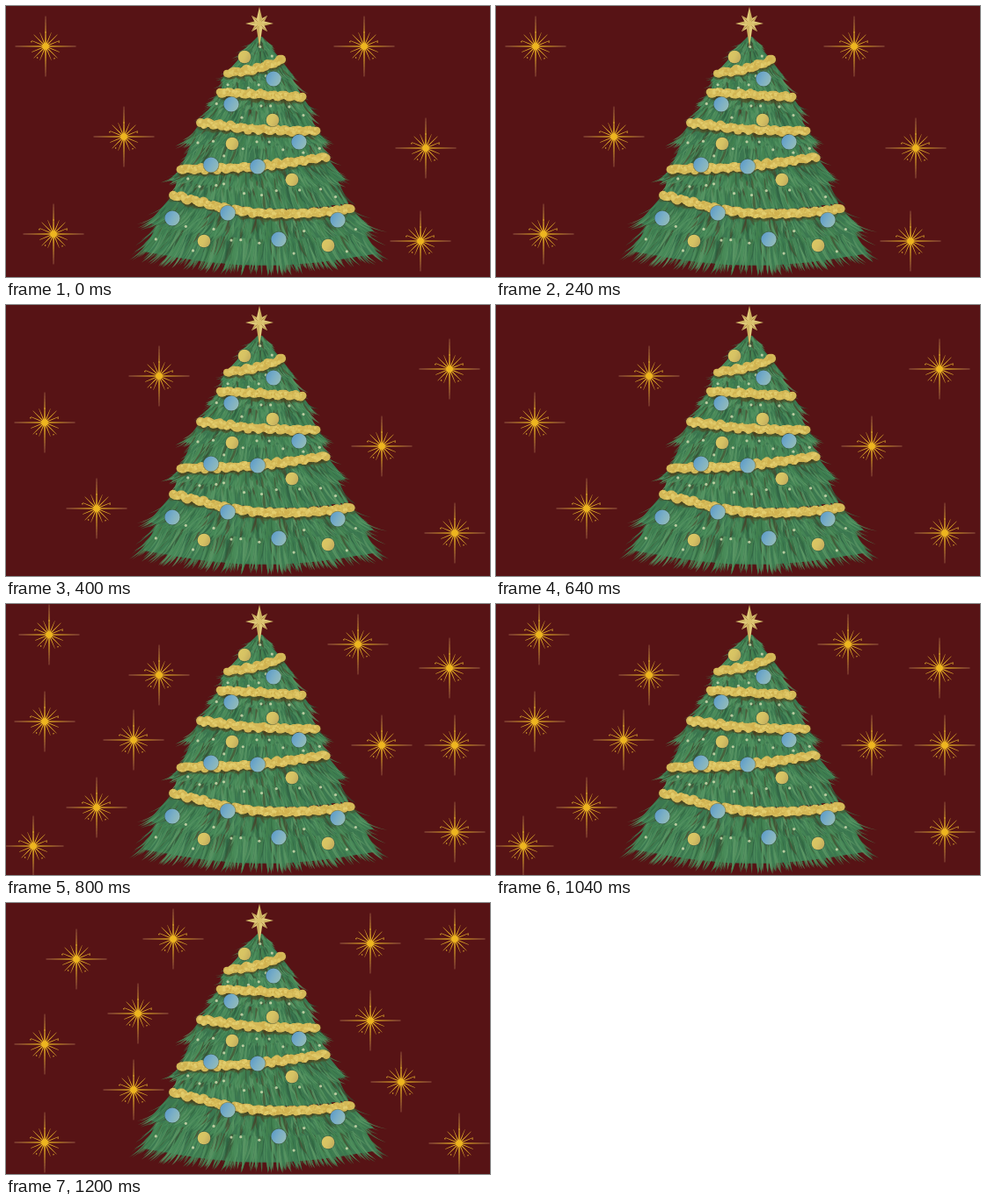
An HTML page with a canvas for the animation above (1600 ms loop, 550 px wide and 309 px high).

```html
<!DOCTYPE html>
<html lang="en">
<head>
<meta charset="utf-8">
<title>Christmas tree with twinkling stars</title>
<style>
  html, body { margin: 0; width: 100%; height: 100%; overflow: hidden; background: #571315; }
  canvas, svg { position: absolute; left: 0; top: 0; width: 100vw; height: 100vh; display: block; }
  .set { visibility: hidden; animation: twinkle 1600ms step-end infinite; }
  @keyframes twinkle {
    0% { visibility: visible; }
    25%, 100% { visibility: hidden; }
  }
</style>
</head>
<body>
<canvas id="tree"></canvas>
<svg id="sky" viewBox="0 0 550 309"></svg>
<script>
const W = 550, H = 309;

// ---------- twinkling stars ----------
const middleSet = [[174, 81], [44, 134], [103, 232], [504, 73], [427, 161], [510, 260]];
const starSets = [
  [[45, 46], [407, 46], [134, 149], [477, 162], [54, 260], [471, 268]],
  middleSet,
  [...middleSet, [49, 35], [145, 155], [31, 276], [400, 46], [510, 161]],
  [[190, 41], [80, 64], [150, 126], [44, 161], [145, 213], [44, 273],
   [414, 46], [510, 41], [414, 134], [449, 204], [515, 274]]
];

function sparkleShape() {
  let shape = '<circle r="3.8"/>';
  for (let i = 0; i < 16; i++) {
    const long = i % 4 === 0;
    const length = long ? 34.5 : i % 2 ? 17 : 19;
    const half = long ? 0.85 : 0.65;
    shape += `<path transform="rotate(${i * 22.5})" d="M0 ${-half}L${length} -.2V.2L0 ${half}z"/>`;
  }
  for (let i = 0; i < 5; i++)
    shape += `<circle transform="rotate(${i * 72 - 18})" cx="${16 + i % 2}" r=".75"/>`;
  return shape;
}

document.getElementById('sky').innerHTML =
  `<defs><radialGradient id="gold" gradientUnits="userSpaceOnUse" cx="0" cy="0" r="35">
     <stop offset="0" stop-color="#efb71e"/><stop offset=".5" stop-color="#dca62b"/>
     <stop offset="1" stop-color="#d39a70"/></radialGradient>
   <g id="sparkle" fill="url(#gold)">${sparkleShape()}</g></defs>` +
  starSets.map((set, i) =>
    `<g class="set" style="animation-delay:${i * 400 - 1600}ms">` +
    set.map(([x, y]) => `<use href="#sparkle" x="${x}" y="${y}"/>`).join('') + '</g>').join('');

// ---------- drawing helpers ----------
const canvas = document.getElementById('tree');
const scale = window.devicePixelRatio || 1;
canvas.width = W * scale;
canvas.height = H * scale;
const ctx = canvas.getContext('2d');
ctx.scale(scale, scale);

let seed = 2412;
const random = () => (seed = (seed * 16807) % 2147483647) / 2147483647;
const spread = (a) => (random() * 2 - 1) * a;
const pick = (list) => list[Math.floor(random() * list.length)];
const mix = (a, b, t) => a + (b - a) * t;

function disc(x, y, r, color) {
  ctx.fillStyle = color;
  ctx.beginPath();
  ctx.arc(x, y, r, 0, Math.PI * 2);
  ctx.fill();
}

function needle([x0, y0], [x1, y1], width, color) {
  const cx = mix(x0, x1, 0.3), cy = mix(y0, y1, 0.65);
  ctx.fillStyle = color;
  ctx.beginPath();
  ctx.moveTo(x0, y0);
  ctx.quadraticCurveTo(cx - width, cy, x1, y1);
  ctx.quadraticCurveTo(cx + width, cy, x0, y0);
  ctx.fill();
}

// ---------- tree ----------
// Hanging lines from apex through the garlands to the hem: [left x, left y, right x, right y, sag]
const lines = [
  [286, 35, 291, 35, 0],
  [251, 76, 313, 62, 3],
  [243, 98, 337, 104, 0],
  [221, 133, 353, 142, 3],
  [198, 186, 364, 172, 4],
  [190, 215, 392, 231, 13],
  [152, 287, 425, 288, 15]
];
const onLine = ([ax, ay, bx, by, sag], u) =>
  [mix(ax, bx, u), mix(ay, by, u) + sag * Math.sin(Math.PI * u)];

const greens = ['#42804f', '#4a8c5a', '#539462', '#458757', '#3b7850', '#5c9765'];
const shades = ['#2b5b3d', '#30643f', '#45482c', '#4c4029', '#385236'];

function paintLayer(upper, lower) {
  const at = (u, v) => {
    const [x0, y0] = onLine(upper, u), [x1, y1] = onLine(lower, u);
    return [mix(x0, x1, v), mix(y0, y1, v)];
  };
  ctx.fillStyle = '#3c7750';
  ctx.beginPath();
  for (let u = 0; u <= 1.001; u += 0.05) ctx.lineTo(...at(u, 0));
  for (let u = 1; u >= -0.001; u -= 0.05) ctx.lineTo(...at(u, 0.9));
  ctx.fill();

  const count = (lower[2] - lower[0]) * 1.7;
  for (let i = 0; i < count; i++) {
    const u = random(), start = random() * 0.65;
    const end = Math.min(1.05, start + 0.35 + random() * 0.45);
    const [x, y] = at(u + (u - 0.5) * 0.06, end);
    const shadow = 0.28 + 0.2 * Math.sin(u * 31 + lower[1]);
    const dark = end < 1 && random() < shadow;
    ctx.globalAlpha = dark ? 0.6 : 0.75;
    needle(at(u, start), [x + spread(6), y + spread(3)], 1.4 + random() * 2, pick(dark ? shades : greens));
  }
  ctx.globalAlpha = 1;
}

for (let i = lines.length - 1; i > 0; i--) {
  const upper = lines[i - 1], lower = lines[i];
  paintLayer(upper, lower);
  // flared fringe halfway down each tier
  const fringe = upper.map((value, k) => mix(value, lower[k], 0.5));
  const flare = fringe[1] * 0.05;
  fringe[0] -= flare;
  fringe[2] += flare;
  paintLayer(upper, fringe);
}

// snow flecks, more of them on the wider tiers
for (let i = 1; i < lines.length; i++) {
  for (let k = 0; k < i * 2 + 1; k++) {
    const u = (k + 0.5 + spread(0.3)) / (i * 2 + 1);
    const [x0, y0] = onLine(lines[i - 1], u), [x1, y1] = onLine(lines[i], u);
    const v = 0.3 + random() * 0.5;
    disc(mix(x0, x1, v), mix(y0, y1, v), 1.6, 'rgba(207,217,174,.85)');
  }
}

// fluffy tinsel built from overlapping dabs
function paintGarland(line) {
  const length = line[2] - line[0];
  const dab = (step, draw) => {
    for (let d = 0; d <= length; d += step) {
      const [x, y] = onLine(line, d / length);
      draw(x, y + Math.sin(d * 0.5) * 1.2);
    }
  };
  dab(2, (x, y) => disc(x + spread(2), y + 2 + spread(2), 5.4, 'rgba(80,62,28,.3)'));
  dab(2, (x, y) => disc(x, y + spread(1), 4 + random() * 1.2, '#d3b858'));
  dab(0.8, (x, y) => disc(x + spread(1.5), y + spread(3.5), 0.7 + random() * 1.4,
    pick(['#dfc867', '#e3cd6e', '#dac05d', '#d0b14f'])));
}
lines.slice(1, -1).forEach(paintGarland);

// ---------- baubles ----------
function bauble(x, y, r, [light, main, dark]) {
  const shade = ctx.createLinearGradient(x - r, y - r * 0.5, x + r, y + r * 0.5);
  shade.addColorStop(0.1, dark);
  shade.addColorStop(0.5, main);
  shade.addColorStop(0.95, light);
  disc(x, y, r + 0.7, 'rgba(60,75,60,.5)');
  disc(x, y, r, shade);
}
const blue = ['#93bcb9', '#7bafc6', '#629fc8'];
const yellow = ['#c3ad5c', '#d6c264', '#dbc763'];
for (const [x, y] of [[304, 83], [256, 112], [333, 155], [233, 181], [286, 183],
                      [189, 242], [252, 236], [377, 244], [310, 266]]) bauble(x, y, 8.6, blue);
for (const [x, y] of [[271, 58], [303, 130], [257, 157], [325, 198], [225, 268], [366, 273]])
  bauble(x, y, 7.3, yellow);

// ---------- tree topper ----------
function topperPoint(angle, length, half) {
  ctx.save();
  ctx.translate(288, 20);
  ctx.rotate(angle);
  for (const [side, color] of [[-1, '#dfc878'], [1, '#cbb05e']]) {
    ctx.fillStyle = color;
    ctx.beginPath();
    ctx.moveTo(0, 0);
    ctx.lineTo(side * half, -half * 1.3);
    ctx.lineTo(0, -length);
    ctx.fill();
  }
  ctx.restore();
}
for (let i = 0; i < 8; i++) topperPoint(Math.PI * (i / 4 + 0.25), i % 2 ? 16 : 13, 2.9);
topperPoint(0, 19, 3.4);
topperPoint(Math.PI, 27, 3.4);
disc(288, 20, 3.2, '#dac16c');
</script>
</body>
</html>
```
